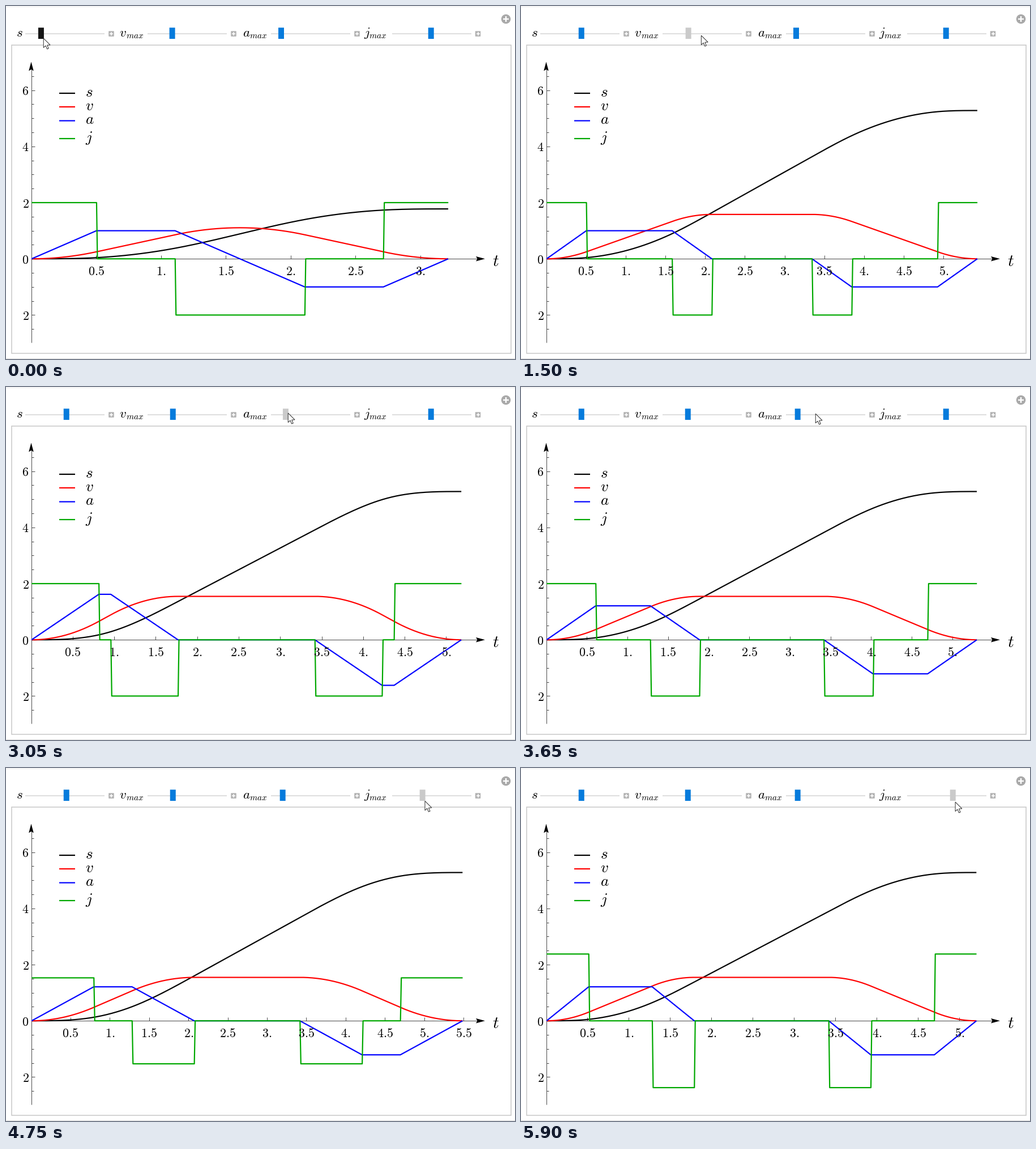
Animation of 899x623 px, one loop 6000 ms. Source, as a matplotlib script:

```python
import numpy as np
import matplotlib.pyplot as plt
from matplotlib.animation import FuncAnimation
from matplotlib.patches import Circle, FancyBboxPatch, Polygon, Rectangle

W, H, DPI = 899, 623, 64
X0, Y0, UNIT, SPAN = 44.5, 446.2, 49.6, 800
STEP, FRAMES = 50, 120
BLUE, GREY, DARK, AXIS = "#067bdc", "#cacaca", "#161616", "#4a4a4a"
COLORS = ["black", "#ff0000", "#0000ff", "#00a800"]

plt.rcParams["mathtext.fontset"] = "cm"
fig = plt.figure(figsize=(W / DPI, H / DPI), dpi=DPI, facecolor="white")
ax = fig.add_axes([0, 0, 1, 1])
ax.set_xlim(0, W)
ax.set_ylim(H, 0)
ax.axis("off")


def pt(px):
    return px * 72 / DPI


def line(xs, ys, color, width, z=1, snap=None):
    return ax.plot(xs, ys, color=color, lw=pt(width), zorder=z, snap=snap,
                   solid_capstyle="butt", solid_joinstyle="round")[0]


def label(x, y, s, size, ha="left"):
    return ax.text(x, y, f"${s}$", fontsize=pt(size), ha=ha,
                   va="baseline", color="black", zorder=6)


def plus(x, y, arm, width):
    line([x - arm, x + arm], [y, y], "white", width, 3)
    line([x, x], [y - arm, y + arm], "white", width, 3)


class Slider:
    """A control dragged from start to end while swinging around that path."""

    def __init__(self, track, top, start, end, drag, grip,
                 swing=0, waves=1, gain=1):
        self.track, self.top = track, top
        self.start, self.end = start, end
        self.drag, self.grip = drag, grip
        self.swing, self.waves, self.gain = swing, waves, gain
        line([track, track + 140], [48.5, 48.5], "#dedede", 2)
        box = track + 152
        ax.add_patch(FancyBboxPatch((box - 4, 45), 8, 8, lw=0, fc="#b4b4b4",
                                    boxstyle="round,pad=0.8,rounding_size=1"))
        plus(box, 49, 3, 1.6)
        self.knob = Rectangle((0, 38.2), 10, 19.8, lw=0, zorder=4, snap=False)
        ax.add_patch(self.knob)

    def value(self, t):
        begin, stop = self.drag
        u = np.clip((t - begin) / (stop - begin), 0, 1)
        wave = np.sin(np.pi * u) * np.sin(self.waves * np.pi * u)
        return self.start + (self.end - self.start) * u + self.swing * wave

    def knob_x(self, value):
        return self.track + 5.2 + 128 * value / self.top

    def pointer(self, t):
        grab = self.knob_x(self.start)
        moved = self.knob_x(self.value(t)) - grab
        return np.array([grab + 4.3 + self.gain * moved,
                         np.interp(t, self.drag, self.grip)])

    def update(self, t):
        begin, stop = self.drag
        value = self.value(t)
        color = BLUE
        if begin < t <= stop:
            color = GREY
        elif begin - 2 * STEP < t <= begin:
            color = DARK
        self.knob.set_facecolor(color)
        self.knob.set_x(self.knob_x(value) - 5)
        return value


sliders = [
    Slider(34, 10, 1.776, 5.277, (0, 550), (57, 52)),
    Slider(250, 5, 1.5, 1.546, (700, 2050), (52, 52),
           swing=-0.1, waves=2, gain=10),
    Slider(468, 10, 1, 1.21, (2400, 3600), (46, 46), swing=0.515),
    Slider(681.5, 4, 2, 2.377, (3900, 5900), (57, 60), swing=-0.667),
]

label(17.5, 54, "s", 23)
for slider, name, gap in zip(sliders[1:], "vaj", (12, 12.5, 9.5)):
    x = slider.track - 50
    label(x, 54, name, 23)
    label(x + gap, 57, "max", 15)


def pointer(t):
    for now, after in zip(sliders, sliders[1:]):
        leave, arrive = now.drag[1], after.drag[0]
        if t <= leave:
            return now.pointer(t)
        if t < arrive:
            u = min((t - leave) / (arrive - leave - STEP), 1)
            u = u * u * (3 - 2 * u)
            return (1 - u) * now.pointer(leave) + u * after.pointer(arrive)
    return sliders[-1].pointer(t)


# Window frame
line([0, W], [0.5, 0.5], "#ececec", 1)
line([0, W], [621.5, 621.5], "#dcdcdc", 1)
ax.add_patch(Rectangle((9.5, 69), 882, 543.5, fc="none", ec="#c6c6c6",
                       lw=pt(1.5)))
ax.add_patch(Circle((883, 23), 8.3, lw=0, fc="#a9a9a9"))
plus(883, 23, 5, 2.4)

# Axes
line([X0, X0], [105, 594], AXIS, 1)
line([X0, 835], [Y0, Y0], AXIS, 1)
head = np.array([(0, 0), (-4.3, 16), (0, 13.5), (4.3, 16)])
ax.add_patch(Polygon(head + (X0, 98.5), lw=0, fc="black"))
ax.add_patch(Polygon(head[:, ::-1] * (-1, 1) + (846, Y0), lw=0, fc="black"))
for k in range(-5, 14):
    y = Y0 - k * UNIT / 2
    major = k % 4 == 0
    line([X0, X0 + (6.5 if major else 4)], [y, y], AXIS, 1)
    if major:
        label(40.5, y + 8.5, str(abs(k) // 2), 22, "right")
label(859, 459, "t", 30)

# Legend and curves
curves = []
for i, (name, color, y) in enumerate(zip("svaj", COLORS,
                                         (154, 178, 202.5, 234))):
    line([94, 122], [y, y], color, 2.2, snap=False)
    label(140, y + 5.7, name, 27)
    curves.append(line([], [], color, 2.2, 2 + 0.1 * i, snap=False))

xticks = line([], [], AXIS, 1)
xlabels = [label(0, 475, f"{k / 2}" if k % 2 else f"{k // 2}.", 22, "center")
           for k in range(1, 14)]

ARROW = np.array([(0, 0), (0, 16.5), (3.8, 13), (6.4, 19), (9, 17.9),
                  (6.5, 12.1), (11.8, 11.8)])
cursor = Polygon(ARROW, closed=True, fc="white", ec="#303030", lw=pt(1),
                 zorder=8)
ax.add_patch(cursor)


def integrate(y, t):
    return np.append(0, np.cumsum((y[1:] + y[:-1]) / 2 * np.diff(t)))


def profile(s, v, a, j):
    """Knots of the seven phases, then distance, speed and acceleration."""
    tj = a / j
    peak = min(v, a / 2 * (np.sqrt(tj ** 2 + 4 * s / a) - tj))
    ta = max(peak / a - tj, 0)
    tv = max(s / peak - peak / a - tj, 0)
    knots = np.append(0, np.cumsum([tj, ta, tj, tv, tj, ta, tj]))
    t = np.unique(np.append(np.linspace(0, knots[-1], 500), knots))
    acc = np.interp(t, knots, [0, a, a, 0, 0, -a, -a, 0])
    vel = integrate(acc, t)
    return knots, t, integrate(vel, t), vel, acc


def update(n):
    time = min(n, FRAMES - 2) * STEP
    s, v, a, j = [slider.update(time) for slider in sliders]
    knots, t, *series = profile(s, v, a, j)
    end = knots[-1]
    scale = SPAN / (end + 0.28)

    for curve, values in zip(curves, series):
        curve.set_data(X0 + 0.7 + t * scale, Y0 - values * UNIT)

    # Jerk steps lean slightly to the right
    px, py = [], []
    for i, level in enumerate([j, 0, -j, 0, -j, 0, j]):
        if knots[i + 1] - knots[i] > 1e-6:
            px += [X0 + knots[i] * scale + (2.4 if i else 0.7),
                   X0 + knots[i + 1] * scale + 0.9]
            py += [Y0 - level * UNIT] * 2
    curves[3].set_data(px, py)

    tx, ty = [], []
    for k, text in enumerate(xlabels, 1):
        x = X0 + k / 2 * scale
        shown = k / 2 <= end + 0.05
        text.set_visible(shown)
        text.set_x(x)
        if shown:
            tx += [x, x, np.nan]
            ty += [Y0, Y0 - 6.5, np.nan]
    xticks.set_data(tx, ty)

    cursor.set_xy(ARROW + pointer(time))
    return []


anim = FuncAnimation(fig, update, frames=FRAMES, interval=STEP,
                     init_func=lambda: update(0), repeat=True,
                     repeat_delay=0, blit=False)
plt.show()
```
